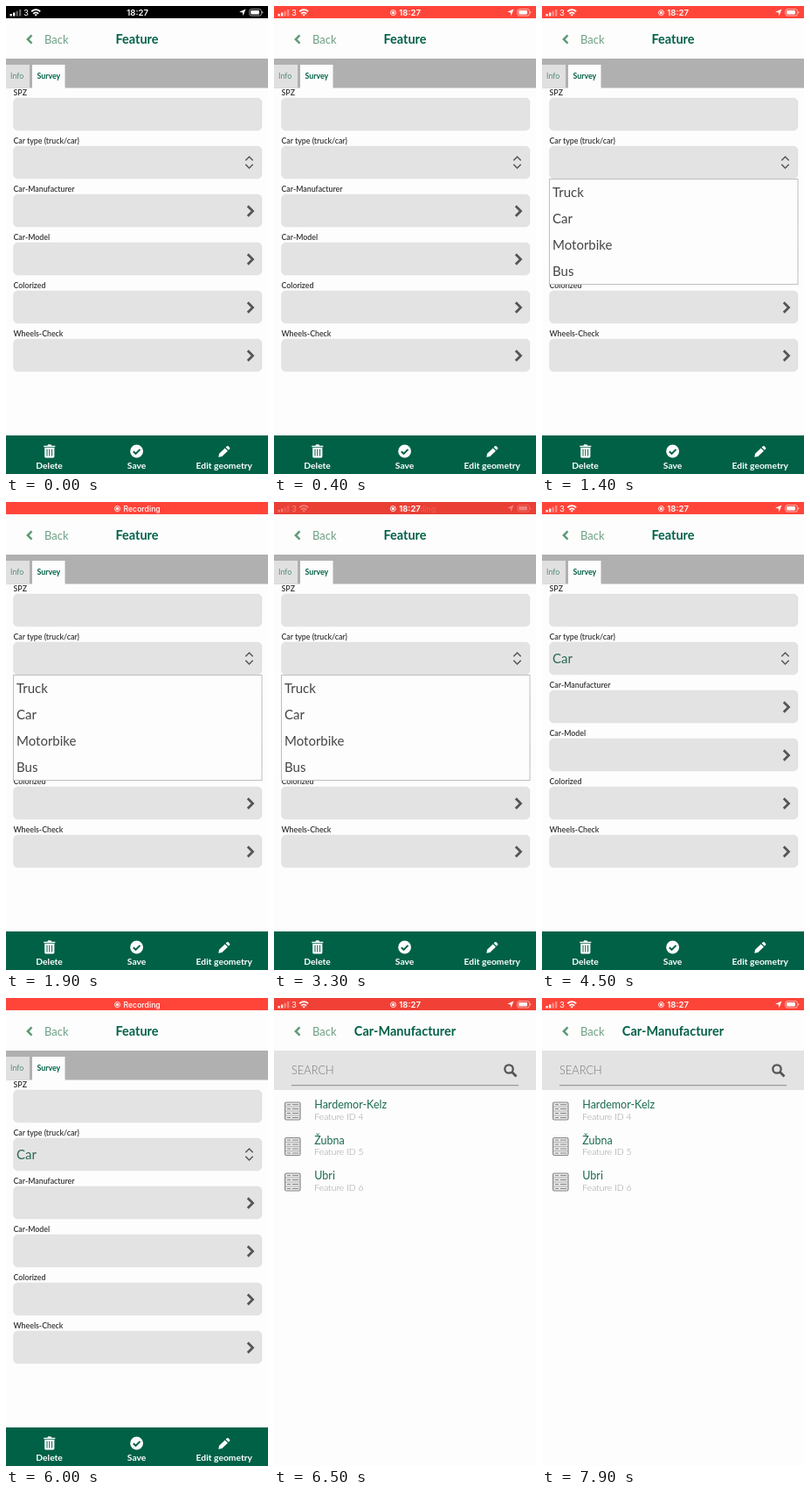
Recreate the animation shown at these times as an HTML page. Size 300 by 534 pixels, loop 8 s.

```html
<!DOCTYPE html>
<html lang="en">
<head>
<meta charset="utf-8">
<title>Survey form</title>
<style>
  html, body { margin: 0; width: 100%; height: 100%; overflow: hidden; background: #fefdfe; }
  svg { display: block; width: 300px; height: 534px; font-family: Lato, sans-serif; }
  .status { font: 600 9.6px Inter, sans-serif; fill: #fff; }
  .title { font-size: 14.5px; font-weight: 700; fill: #006146; text-anchor: middle; }
  .label { font-size: 8.8px; font-weight: 600; fill: #333; }
  .tab { font-size: 8.8px; fill: #006146; }
  .big { font-size: 15px; fill: #444; }
  .tool { font-size: 10.3px; font-weight: 700; fill: #fff; text-anchor: middle; }
  .line { fill: none; stroke: #555; }
</style>
</head>
<body>
<svg viewBox="0 0 300 534">
  <rect width="300" height="534" fill="#fefdfe"/>

  <g id="form">
    <rect y="60" width="300" height="33.5" fill="#b1b0b1"/>
    <rect y="67" width="27" height="26.5" fill="#e1e0e1"/>
    <rect x="30" y="67" width="37.5" height="27.5" fill="#fefdfe"/>
    <text class="tab" x="5" y="83.3" style="fill:#4f8f75">Info</text>
    <text class="tab" x="35.5" y="83.3" font-weight="700">Survey</text>
    <g id="fields"></g>
    <path class="line" stroke-width="1.5" d="M274.3 176.2l4.2-4.2 4.2 4.2M274.3 180.8l4.2 4.2 4.2-4.2"/>
    <text id="choice" class="big" x="12" y="184" style="fill:#2b6b53">Car</text>
    <g id="menu">
      <rect x="8.5" y="197.5" width="284.5" height="120" fill="#fefdfe" stroke="#bfbebf"/>
    </g>
    <rect y="490" width="300" height="44" fill="#006146"/>
    <g fill="#fff">
      <path d="M43.3 501.7h4l1-1.5h3l1 1.5h4v1.5h-13zM44.2 504h11.2v10q0 1.6-1.6 1.6h-8q-1.6 0-1.6-1.6z"/>
      <circle cx="149.6" cy="508" r="7.4"/>
      <path d="M243.3 514.7l.8-4 6.6-6.2 3.2 3.2-6.6 6.2zM251.6 503.6l1.4-1.3q.8-.7 1.6 0l1.5 1.6q.7.8 0 1.5l-1.3 1.4z"/>
    </g>
    <path d="M47 505.5v8M49.8 505.5v8M52.6 505.5v8" stroke="#006146" fill="none"/>
    <path d="M145.8 508.2l2.7 2.7 5-5" stroke="#006146" stroke-width="2" fill="none"/>
    <text class="tool" x="49.6" y="528">Delete</text>
    <text class="tool" x="149.6" y="528">Save</text>
    <text class="tool" x="249.8" y="528">Edit geometry</text>
  </g>

  <g id="list">
    <rect y="60" width="300" height="45" fill="#e4e3e4"/>
    <text x="20" y="87" font-size="12.8" font-weight="300" fill="#777">SEARCH</text>
    <path d="M20 99.7H280" stroke="#888"/>
    <circle class="line" cx="269" cy="81" r="4.7" stroke-width="2.3"/>
    <path class="line" d="M272.5 84.5l5 5" stroke-width="2.8"/>
  </g>

  <path d="M29.5 33.3l-4.7 4.7 4.7 4.7" fill="none" stroke="#5f9b78" stroke-width="2.5"/>
  <text x="44" y="42.5" font-size="13" fill="#6b9f83">Back</text>
  <text id="title" class="title" x="150" y="43"></text>

  <rect width="300" height="14"/>
  <rect id="bar" width="300" height="14" fill="#ff453a"/>
  <g class="status">
    <g id="icons">
      <path d="M4.5 9h2.3v2.5H4.5zM8 7.5h2.3v4H8z"/>
      <path d="M11.5 5.8h2.3v5.7h-2.3zM15 4h2.3v7.5H15z" opacity=".4"/>
      <text x="20" y="11" style="font-weight:400">3</text>
      <path d="M29.2 6.3q5-4.4 10 0M31.2 8.7q3-2.6 6 0" fill="none" stroke="#fff" stroke-width="1.8"/>
      <path d="M32.5 9.8q1.7-1.3 3.4 0l-1.7 1.9z"/>
      <path d="M274.5 3.6l-3 7.6-.6-3.8-3.8-.6z"/>
      <rect x="278.8" y="3.6" width="13.6" height="7.4" rx="2" fill="none" stroke="#fff" stroke-width=".8" opacity=".75"/>
      <rect x="280.2" y="5" width="9.8" height="4.6" rx="1"/>
      <path d="M293.4 6q2 1.3 0 2.6z"/>
    </g>
    <g id="dot">
      <circle r="3" fill="none" stroke="#fff" stroke-width=".9"/>
      <circle r="1.6"/>
    </g>
    <text id="clock" y="11">18:27</text>
    <text id="rec" y="11" style="font-size:8.7px;font-weight:500">Recording</text>
  </g>
</svg>
<script>
const $ = id => document.getElementById(id);
const add = (id, html) => $(id).insertAdjacentHTML('beforeend', html);
const show = (id, on) => $(id).style.display = on ? '' : 'none';
const fade = (id, value) => $(id).setAttribute('opacity', value);
const ramp = (t, from, to) => Math.min(1, Math.max(0, (t - from) / (to - from)));
const smooth = p => p * p * (3 - 2 * p);

const fields = ['SPZ', 'Car type (truck/car)', 'Car-Manufacturer', 'Car-Model', 'Colorized', 'Wheels-Check'];
fields.forEach((name, i) => {
  const y = 55 * i;
  add('fields', `<text class="label" x="8.5" y="${y + 102}">${name}</text>
    <rect x="8.5" y="${y + 105}" width="284.5" height="37" rx="5" fill="#e4e3e4" stroke="#dddcdd" stroke-width=".5"/>`);
  if (i > 1) add('fields', `<path class="line" stroke-width="2.8" d="M276.8 ${y + 118.3}l5.7 5.7-5.7 5.7"/>`);
});

['Truck', 'Car', 'Motorbike', 'Bus'].forEach((name, i) =>
  add('menu', `<text class="big" x="12" y="${218 + 30 * i}">${name}</text>`));

['Hardemor-Kelz', 'Žubna', 'Ubri'].forEach((name, i) => add('list',
  `<g transform="translate(0 ${40.5 * i})">
    <rect x="12.6" y="119" width="17.4" height="20" rx="1.5" fill="#e6e5e6" stroke="#888" stroke-width="1.2"/>
    <path d="M13 124h17M13 129h17M13 134h17" stroke="#aaa" stroke-width=".8"/>
    <path d="M15 121.6h4M21 121.6h7M15 126.5h4M21 126.5h7M15 131.5h4M21 131.5h7M15 136.5h4M21 136.5h7" stroke="#888"/>
    <text x="46.3" y="126" font-size="12.5" fill="#17694f">${name}</text>
    <text x="46.3" y="138.7" font-size="10.4" font-weight="300" fill="#999">Feature ID ${4 + i}</text>
  </g>`));

// The status bar alternates between "Recording" (0) and the clock (1).
const firstSwap = 1650, swapCycle = 3120;
function clockPhase(t) {
  if (t < firstSwap) return 1;
  const u = (t - firstSwap) % swapCycle;
  return u < 1000 ? 1 - ramp(u, 0, 240) : ramp(u, 1500, 1800);
}

function draw(t) {
  const red = smooth(ramp(t, 100, 380));
  const p = clockPhase(t);
  const slide = 1 - smooth(ramp(p, 0, 0.55));

  fade('bar', red * (1 - 0.085 * Math.sin(Math.PI * p)));
  fade('dot', red);
  fade('icons', ramp(p, 0.35, 0.8));
  fade('clock', ramp(p, 0.1, 0.5));
  fade('rec', 1 - ramp(p, 0, 0.58));
  $('dot').setAttribute('transform', `translate(${136.5 - 9 * slide} 7.6)`);
  $('clock').setAttribute('x', 138.3 + 5 * red - 8.5 * slide);
  $('rec').setAttribute('x', 143 - 8.5 * slide);

  const picking = t >= 6400;
  show('form', !picking);
  show('list', picking);
  show('menu', t >= 1300 && t < 4000);
  show('choice', t >= 4000);
  $('title').textContent = picking ? 'Car-Manufacturer' : 'Feature';
}

const start = performance.now();
(function tick() {
  draw((performance.now() - start) % 8000);
  requestAnimationFrame(tick);
})();
</script>
</body>
</html>
```
